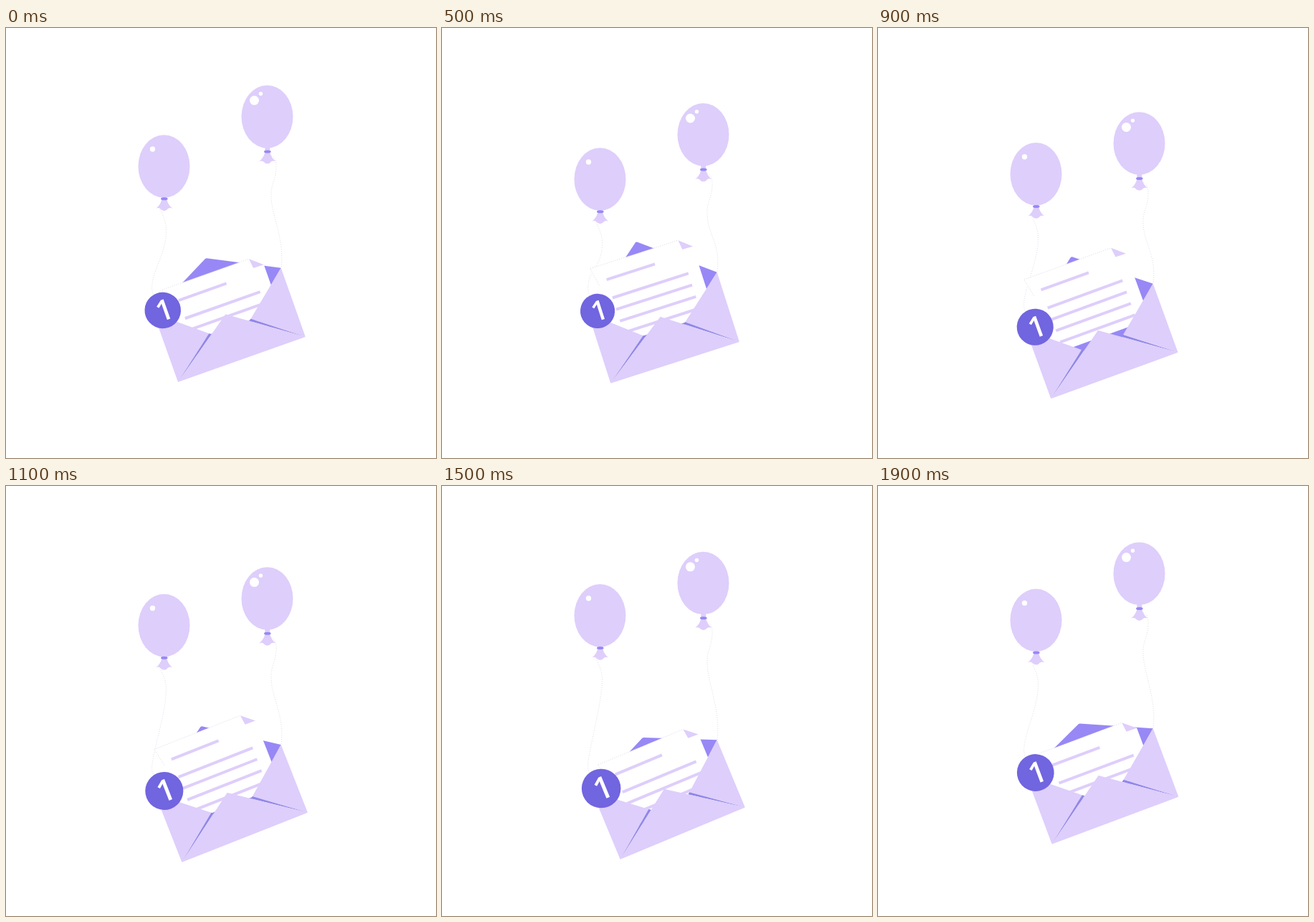
An HTML page with a canvas that plays this animation: 600 px wide and 600 px high, repeating every 2000 ms.

```html
<!DOCTYPE html>
<html lang="en">
<head>
<meta charset="utf-8">
<title>Mail on balloons</title>
<style>
  html, body { margin: 0; width: 100%; height: 100%; overflow: hidden; background: #fff; }
  canvas { display: block; width: 600px; height: 600px; }
</style>
</head>
<body>
<canvas id="stage" width="600" height="600"></canvas>
<script>
const ctx = document.getElementById('stage').getContext('2d');

const LOOP = 2000, STEP = 100;
const RATE = 0.1776; // degrees per ms
const LAVENDER = '#decefb', PURPLE = '#9788f6', WEDGE = '#9087e8', BADGE = '#7165e0';
const FAINT = '#cfcbdc';

// Envelope size; its origin is the top right corner
const W = 188.7, H = 102, MID = -W / 2;

const rad = deg => deg * Math.PI / 180;

function shape(color, ...points) {
  ctx.fillStyle = color;
  ctx.beginPath();
  points.forEach(([x, y]) => ctx.lineTo(x, y));
  ctx.closePath();
  ctx.fill();
}

function oval(color, x, y, rx, ry = rx) {
  ctx.fillStyle = color;
  ctx.beginPath();
  ctx.ellipse(x, y, rx, ry, 0, 0, 2 * Math.PI);
  ctx.fill();
}

function line(color, width, x1, y1, x2, y2) {
  ctx.strokeStyle = color;
  ctx.lineWidth = width;
  ctx.beginPath();
  ctx.moveTo(x1, y1);
  ctx.lineTo(x2, y2);
  ctx.stroke();
}

function thread(path) {
  ctx.strokeStyle = FAINT;
  ctx.lineWidth = 0.7;
  ctx.setLineDash([1, 2]);
  ctx.stroke(path);
  ctx.setLineDash([]);
}

function balloon(x, y, neck, shines) {
  ctx.save();
  ctx.translate(x, y);
  oval(LAVENDER, 0, 0, 36, 43.8);
  shines.forEach(([sx, sy, r]) => oval('#fff', sx, sy, r));
  ctx.translate(0.3, neck);
  ctx.fillStyle = LAVENDER;
  ctx.fillRect(-3.5, -6, 7, 7);
  ctx.fill(new Path2D('M-3.5 1 C-5 7 -8 11 -11.5 13.5 Q-8 12 -5.5 14 Q-3 17 0 16.7 ' +
    'Q3 17 5 14 Q8 12 11.5 13.5 C8 11 5 7 3.5 1 Z'));
  oval(PURPLE, 0, 0, 4.8, 2);
  ctx.restore();
}

function strings(leftY, rightY, cornerY, badgeY) {
  thread(new Path2D(`M367 ${rightY + 54} Q378 ${rightY + 54} 377 ${rightY + 72}
    C376 ${rightY + 90} 369 ${rightY + 95} 370 ${rightY + 112}
    C371 ${rightY + 140} 389 ${cornerY - 40} 384 ${cornerY}`));
  thread(new Path2D(`M214 ${leftY + 57} C217 ${leftY + 66} 224 ${leftY + 76} 223.5 ${leftY + 90}
    C223 ${leftY + 122} 206 ${badgeY - 58} 204 ${badgeY - 36}
    Q202 ${badgeY - 26} 209 ${badgeY - 14}`));
}

function letter(y) {
  ctx.save();
  ctx.translate(-38, y);
  const left = -129, right = 17;
  shape('#fff', [left, 0], [0, 0], [right, 14.5], [right, 112], [left, 112]);
  const edge = new Path2D();
  edge.moveTo(left + 5, 26);
  edge.lineTo(left, 0);
  edge.lineTo(0, 0);
  thread(edge);
  shape(LAVENDER, [0, 0], [right, 14.5], [1.7, 14]);
  line(LAVENDER, 4, -111.7, 21.7, -41, 21.7);
  for (let i = 0; i < 4; i++) {
    const v = 48.4 + 17 * i;
    line(LAVENDER, 4, -111.7, v, -0.4, v);
  }
  ctx.restore();
}

function front() {
  const innerY = 52.6, half = 30.9;
  for (const side of [-1, 1]) {
    const edge = MID + side * W / 2;
    const inner = [MID + side * half, innerY];
    shape(LAVENDER, [edge, 0], inner, [edge, H]);
    shape(WEDGE, inner, [MID + side * 27.8, 54.7], [edge, H]);
  }
  shape(LAVENDER, [-W, H], [MID - 1, 35.6], [MID, 35], [MID + 1, 35.6], [0, H]);
}

function badge(r) {
  ctx.save();
  ctx.translate(-175.2, 0.5);
  oval(BADGE, 0, 0, r);
  ctx.fillStyle = '#fff';
  ctx.font = `600 ${1.6 * r}px "Open Sans", "Noto Sans", sans-serif`;
  const m = ctx.measureText('1');
  ctx.fillText('1', (m.actualBoundingBoxLeft - m.actualBoundingBoxRight) / 2,
    (m.actualBoundingBoxAscent - m.actualBoundingBoxDescent) / 2);
  ctx.restore();
}

function draw(t) {
  const wave = (mid, amp, phase) => mid + amp * Math.sin(rad(RATE * t + phase));
  const leftY = wave(195.8, 15.5, -10.5);
  const rightY = wave(141.7, -19.4, 112.3);
  const cornerY = wave(347.3, 13.9, -116.5);
  const tilt = rad(wave(-20.2, 2.45, 15.5));
  const flapY = wave(-58.2, 19.7, 147);
  const letterY = wave(-45, 23.2, 128.5);
  const badgeR = wave(25.7, -1.65, 15.5);
  const badgeY = cornerY - 175.2 * Math.sin(tilt);

  ctx.fillStyle = '#fff';
  ctx.fillRect(0, 0, 600, 600);
  strings(leftY, rightY, cornerY, badgeY);
  balloon(220.5, leftY, 45.2, [[-16, -24, 3.7]]);
  balloon(364.5, rightY, 48.8, [[-18, -22.7, 6.5], [-9, -32, 2.7]]);

  ctx.save();
  ctx.translate(383.7, cornerY);
  ctx.rotate(tilt);
  shape(PURPLE, [-W, 0], [MID - 1, flapY], [MID + 1, flapY], [0, 0], [MID, 80]);
  letter(letterY);
  front();
  badge(badgeR);
  ctx.restore();
}

// The motion advances in steps of a tenth of a second
function tick(now) {
  draw(Math.floor(((now + 2) % LOOP) / STEP) * STEP);
  requestAnimationFrame(tick);
}
draw(0);
requestAnimationFrame(tick);
</script>
</body>
</html>
```
